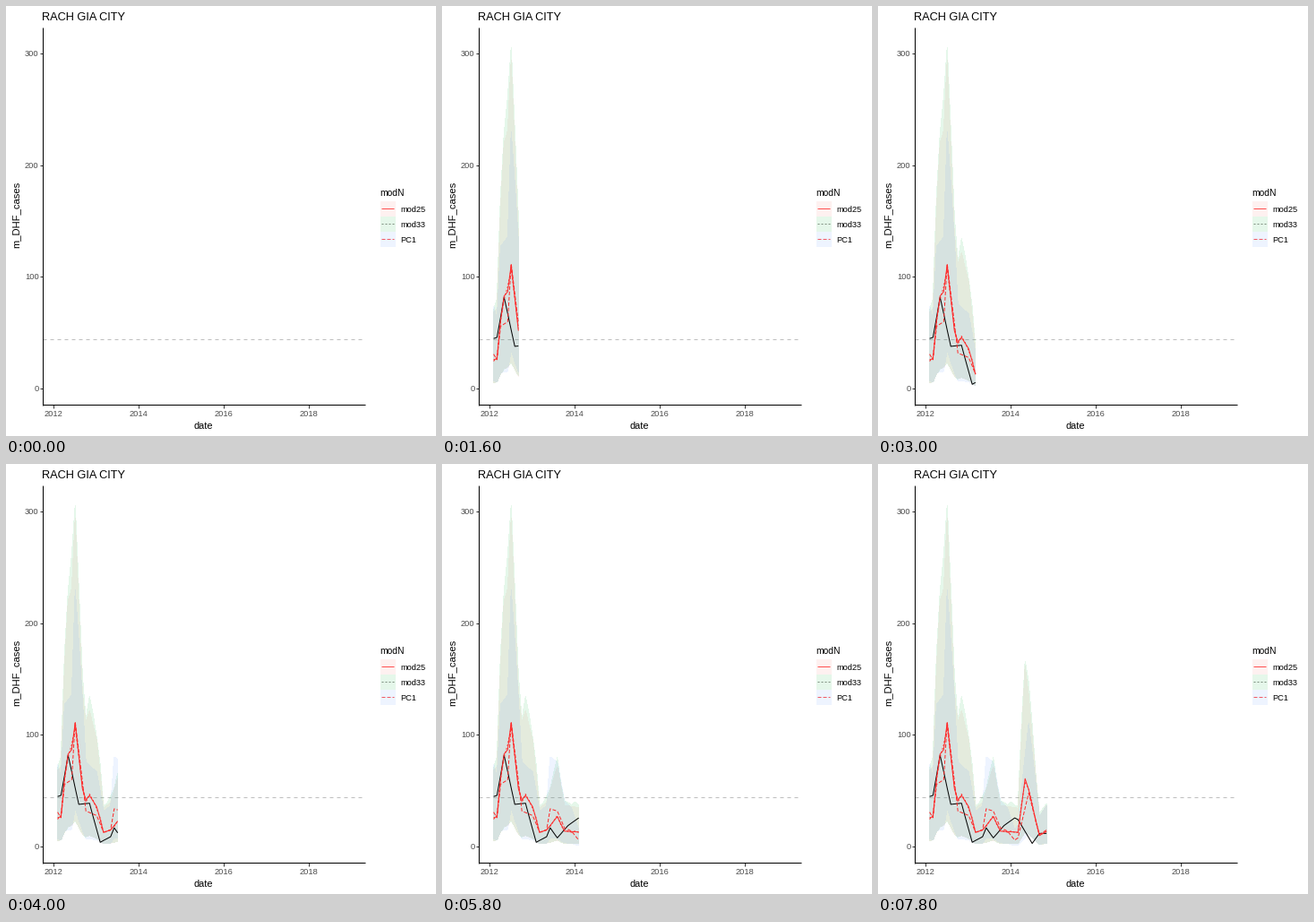
These frames come from a looping animation (480 px wide and 480 px high, 8000 ms). A matplotlib script:

```python
import numpy as np
import matplotlib.pyplot as plt
from matplotlib.animation import FuncAnimation
from matplotlib.patches import Polygon, Rectangle

SIZE, DPI = 480, 80
PX = 72 / DPI  # points per pixel
FRAMES, INTERVAL = 40, 200
RED = "#ff2a2a"
NAMES = ["mod25", "mod33", "PC1"]
FILLS = ["#F8766D", "#00BA38", "#619CFF"]
STYLES = ["-", (0, (2, 2)), (0, (4, 2))]
KEY_LINES = ["#ff5050", "#7f8f80", "#f05a64"]

plt.rcParams["font.family"] = "Liberation Sans"

# monthly series from February 2012 to November 2014
dates = np.arange("2012-02", "2014-12", dtype="datetime64[M]")
days = (dates.astype("datetime64[D]") - np.datetime64("2012-02-01")).astype(int)
months = np.arange(len(days))
xs = 57.3 + 0.13 * days
stops = np.round(days * 99 / 2526)  # each month lands on a whole frame


def curve(*knots):
    """Monthly values along straight runs between (month, value) turning points."""
    return np.interp(months, *zip(*knots))


cases = curve((0, 45), (1, 46), (3, 82), (6, 38), (9, 39), (12, 4), (15, 9),
              (16, 17), (18, 8), (21, 19), (24.5, 27), (29, 3), (31, 12), (33, 12))
mod25 = curve((0, 26), (1, 27), (2, 61), (3, 83), (4, 87), (5, 111), (7, 52),
              (8, 42), (9, 46), (11, 36), (13, 13), (15, 15), (18, 27),
              (20, 14), (25, 13), (27, 61), (28, 51), (31, 10), (33, 14))
mod33 = mod25 * (1 + 0.05 * np.cos(2.3 * (months - 4)))
pc1 = curve((0, 31), (1, 26), (2, 56), (4, 60), (5, 112), (8, 32), (11, 28),
            (13, 13), (15, 15), (16, 34), (18, 32), (20, 17), (22, 14),
            (24, 6), (25, 8), (28, 48), (31, 11), (33, 15))
means = [mod25, mod33, pc1]

# bands grow in proportion to the mean
uppers = [2.65 * mod25, 2.85 * mod33, pc1 * (2.5 - 0.004 * pc1)]
lowers = [0.22 * mod25, 0.22 * mod33, pc1 * (0.2 + 0.001 * pc1)]


def to_y(v):
    return 427 - 1.2467 * np.asarray(v, float)


fig = plt.figure(figsize=(SIZE / DPI, SIZE / DPI), dpi=DPI, facecolor="white")
ax = fig.add_axes([0, 0, 1, 1])
ax.set_xlim(-0.3, SIZE - 0.3)
ax.set_ylim(SIZE - 0.3, -0.3)
ax.axis("off")


def stroke(x, y, color="black", style="-", z=3):
    line, = ax.plot(x, y, color=color, ls=style, lw=PX, zorder=z,
                    solid_capstyle="butt", dash_capstyle="butt")
    return line


def label(x, y, text, size, color="black", ha="left", va="baseline", **kw):
    ax.text(x, y, text, fontsize=size * PX, color=color, ha=ha, va=va, **kw)


# axes, ticks and titles
stroke([41, 41], [24, 445.5], z=6)
stroke([41, 400.5], [445, 445], z=6)
for v in range(0, 301, 100):
    y = round(float(to_y(v)))
    stroke([38, 41], [y, y], "#333333", z=5)
    label(36.2, y + 3, v, 9.3, "#4d4d4d", ha="right")
for i, year in enumerate(range(2012, 2020, 2)):
    x = 53 + 95 * i
    stroke([x, x], [445, 448.5], "#333333", z=5)
    label(x, 458, year, 9.3, "#4d4d4d", ha="center")
label(40, 16, "RACH GIA CITY", 12.7)
label(220, 472, "date", 11, ha="center")
label(11, 233, "m_DHF_cases", 11.3, ha="center", va="center", rotation=90)
stroke([41, 400], [372, 372], "#bebebe", (0, (4, 4)), z=1)

# legend
label(417.3, 211.5, "modN", 10.3)
for i, name in enumerate(NAMES):
    y = 226 + 17 * i
    ax.add_patch(Rectangle((417.5, y - 8), 17, 17, fc=FILLS[i], alpha=0.1, lw=0))
    stroke([419, 432.5], [y, y], KEY_LINES[i], STYLES[i])
    label(440.3, y + 4, name, 9.1)

ribbons = []
for i, color in enumerate(FILLS):
    ribbon = Polygon(np.zeros((3, 2)), closed=True, fc=color, alpha=0.1, lw=0,
                     antialiased=False, zorder=2 + i / 10)
    ax.add_patch(ribbon)
    ribbons.append(ribbon)
actual = stroke([], [])
fits = [stroke([], [], RED, style, z=4) for style in STYLES]


def reveal(values, k):
    """Values passed so far plus the interpolated head."""
    return np.append(values[stops < k], np.interp(k, stops, values))


def draw(k):
    x = reveal(xs, k)
    actual.set_data(x, to_y(reveal(cases, k)))
    for fit, ribbon, mean, high, low in zip(fits, ribbons, means, uppers, lowers):
        fit.set_data(x, to_y(reveal(mean, k)))
        edge = np.append(reveal(high, k), reveal(low, k)[::-1])
        ribbon.set_xy(np.column_stack([np.append(x, x[::-1]), to_y(edge)]))
        ribbon.set_visible(k > 0)
    return [actual, *fits, *ribbons]


anim = FuncAnimation(fig, draw, frames=FRAMES, interval=INTERVAL,
                     init_func=lambda: draw(0), repeat=True, repeat_delay=0)
plt.show()
```
